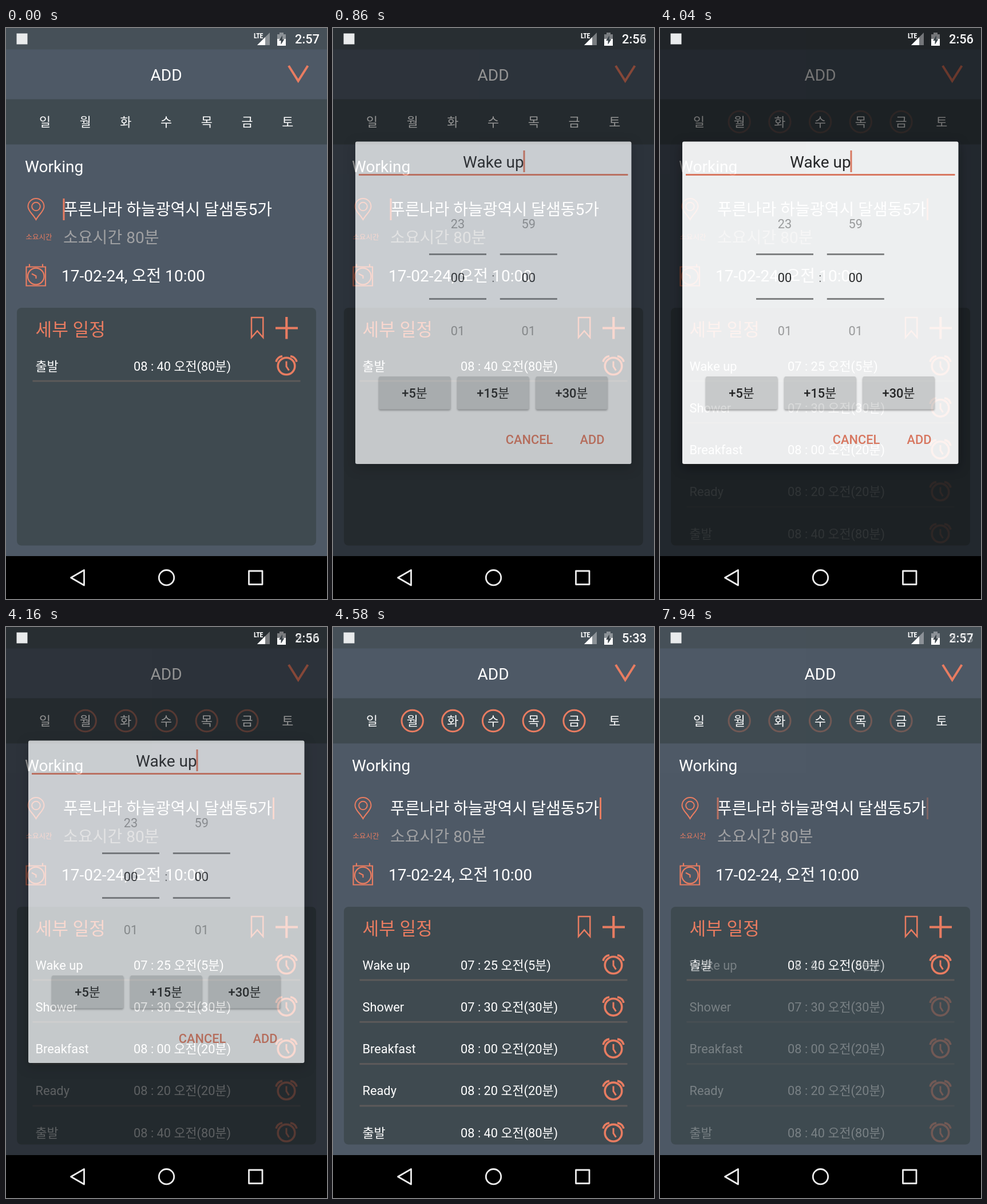
An HTML page that plays this animation: 561 px wide and 998 px high, repeating every 8 s.

```html
<!DOCTYPE html>
<html lang="ko">
<head>
<meta charset="utf-8">
<title>Schedule</title>
<style>
  html, body { margin: 0; width: 100%; height: 100%; overflow: hidden; background: #000; }
  svg { display: block; width: 100%; height: 100%; }
  text { font-family: Roboto, "Noto Sans CJK KR", "Noto Sans CJK", sans-serif; white-space: pre; }
  .mid { text-anchor: middle; }
  .bold { font-weight: 500; }
  .thin { font-weight: 400; }
  .lte { font-family: "Roboto Condensed", Roboto, sans-serif; font-weight: 700; font-stretch: 75%; letter-spacing: -.3px; }
  .line { fill: none; stroke: #e87c61; }
  .shade { filter: drop-shadow(0 6px 10px rgba(0, 0, 0, .45)); }
  .lift { filter: drop-shadow(0 2px 1.5px rgba(0, 0, 0, .35)); }
</style>
</head>
<body>
<svg id="stage" viewBox="0 0 561 998" preserveAspectRatio="none"></svg>
<script>
const ORANGE = '#e87c61', SLATE = '#4e5966', DARK = '#3f4a50';
const S = 21.8, M = 28.05, L = 31.16;

const text = (x, y, size, str, fill = '#fff', cls = '') =>
  `<text x="${x}" y="${y}" font-size="${size}" fill="${fill}" class="${cls}">${str}</text>`;
const rect = (x, y, w, h, fill, r = 0, cls = '') =>
  `<rect x="${x}" y="${y}" width="${w}" height="${h}" fill="${fill}" rx="${r}" class="${cls}"/>`;
const path = (d, width) => `<path class="line" d="${d}" stroke-width="${width}"/>`;
const ring = (x, y, r, width) =>
  `<circle class="line" cx="${x}" cy="${y}" r="${r}" stroke-width="${width}"/>`;

const statusIcons = time =>
  rect(18.5, 9.5, 19, 19, '#e9ebec') +
  text(433, 17.5, 12, 'LTE', '#fff', 'lte') +
  `<path d="M461 8V30H439Z" fill="#fff" opacity=".38"/>
   <path d="M453 16V30H439Z" fill="#fff"/>
   <path d="M478 8h7v3h4v9h-15v-9h4z" fill="#fff" opacity=".38"/>
   <path d="M474 19h15v12h-15z" fill="#fff"/>
   <path d="M483 13v6.5h3.5l-6 9.5v-7h-3.5z" fill="#3c454b"/>` +
  text(505, 27, S, time, '#fff', 'bold');

const navBar = rect(0, 923, 561, 75, '#000') +
  `<g fill="none" stroke="#eee" stroke-width="2.8" stroke-linejoin="round">
     <path d="M136.5 947.5V974L113.5 960.7Z"/>
     <circle cx="280.5" cy="960.7" r="13.2"/>
     <path d="M424.5 949h23.5v23.5h-23.5z"/>
   </g>`;

const days = picked => [...'일월화수목금토'].map((d, i) => {
  const x = 68 + i * 70.7;
  const mark = picked && i > 0 && i < 6 ? ring(x, 164, 18.7, 3) : '';
  return mark + text(x, 172, S, d, '#fff', 'mid');
}).join('');

const alarm = y => `<g transform="translate(490 ${y})">` +
  ring(0, 0.5, 14.8, 3.6) +
  path('M0 -8V1L4.5 8', 3) +
  path('M-18 -7Q-16 -15.5 -7 -17M18 -7Q16 -15.5 7 -17', 3.6) + '</g>';

const row = ([name, time], i) => {
  const y = 590.5 + i * 73.3;
  return text(51.5, y + 8, S, name) + text(223, y + 8, S, time) + alarm(y) +
    (i < 4 ? rect(46.5, y + 25, 468, 3, '#5d5a5a') : '');
};

const icons =
  path('M494 66L510.7 92.5L527.5 66', 4) +
  path('M52.5 335C47 325 38.5 320 38.5 312a14 14 0 0 1 28 0C66.5 320 58 325 52.5 335Z', 2) +
  ring(52.5, 312, 7.3, 2) +
  path('M35.5 417.5h33.5v33h-33.5zM41 412.5v5M64 412.5v5', 2.2) +
  ring(52.3, 434, 14.3, 2.2) +
  path('M45 429.5L52.5 433.5V438', 2.2) +
  path('M429 506H449.3V541L439.2 529.5L429 541Z', 2.5) +
  path('M471 524.5H510M490.3 505V543.5', 4.2);

const page = (caret, picked, rows) =>
  rect(0, 0, 561, 998, SLATE) + rect(0, 0, 561, 37.5, '#465058') +
  rect(0, 124.5, 561, 79, DARK) + rect(19, 489, 523, 415.5, DARK, 8) +
  text(280, 92, M, 'ADD', '#fff', 'mid') + days(picked) + icons +
  text(33, 252, M, 'Working') +
  text(100, 327, M, '푸른나라 하늘광역시 달샘동5가') +
  rect(caret, 298, 3, 38, ORANGE) +
  text(34.5, 370, 12.47, '소요시간', ORANGE) +
  text(100, 376, M, '소요시간 80분', '#a0a1a3') +
  text(97, 443, M, '17-02-24, 오전 10:00') +
  text(51.5, 537.5, L, '세부 일정', ORANGE) +
  rows.map(row).join('');

const picker = (x, above, below) =>
  text(x, 350, S, above, '#a3a3a3', 'mid') +
  text(x, 443.5, S, '00', '#212121', 'mid') +
  text(x, 537, S, below, '#a3a3a3', 'mid') +
  rect(x - 50, 394, 100, 3, '#868686') + rect(x - 50, 472, 100, 3, '#868686');

const button = (min, i) => {
  const x = 80 + i * 137.2;
  return rect(x, 609, 125.3, 57.5, '#d6d7d7', 3, 'lift') +
    text(x + 62.6, 645.5, S, `+${min}<tspan class="thin">분</tspan>`, '#212121', 'mid bold');
};

const dialog =
  rect(39, 198.5, 482.5, 563.5, '#fff', 3, 'shade') +
  text(227, 244, M, 'Wake up', '#212121') +
  rect(332.5, 214, 3, 38, ORANGE) + rect(45, 255, 470.5, 3, ORANGE) +
  picker(218, 23, '01') + picker(341.8, 59, '01') +
  text(280, 443.5, S, ':', '#757575', 'mid') +
  [5, 15, 30].map(button).join('') +
  text(343, 727, S, 'CANCEL', ORANGE, 'mid bold') +
  text(453, 727, S, 'ADD', ORANGE, 'mid bold');

const leave = ['출발', '08 : 40 오전(80분)'];
const plan = [
  ['Wake up', '07 : 25 오전(5분)'],
  ['Shower', '07 : 30 오전(30분)'],
  ['Breakfast', '08 : 00 오전(20분)'],
  ['Ready', '08 : 20 오전(20분)'],
  leave
];

const blank = page(99.5, false, [leave]);
const scene = (id, body, time) => `<g id="${id}">${body}${statusIcons(time)}${navBar}</g>`;

document.getElementById('stage').innerHTML =
  scene('empty', blank, '2:57') +
  scene('popup', blank + rect(0, 0, 561, 923, 'rgba(0,0,0,.6)') + dialog, '2:56') +
  scene('full', page(466, true, plan), '5:33');

// Each row: time in ms, opacity, easing towards the next row.
const LOOP = 8000;
const fades = {
  popup: [[0, 0], [500, 0, 'steps(10, start)'], [1100, 1], [4640, 1], [4640, 0], [LOOP, 0]],
  full: [[0, 0], [4040, 0, 'steps(10, start)'], [4640, 1], [7580, 1, 'steps(7, start)'], [LOOP, .3]]
};
for (const [id, steps] of Object.entries(fades)) {
  document.getElementById(id).animate(
    steps.map(([ms, opacity, easing = 'linear']) => ({ offset: ms / LOOP, opacity, easing })),
    { duration: LOOP, iterations: Infinity });
}
</script>
</body>
</html>
```
